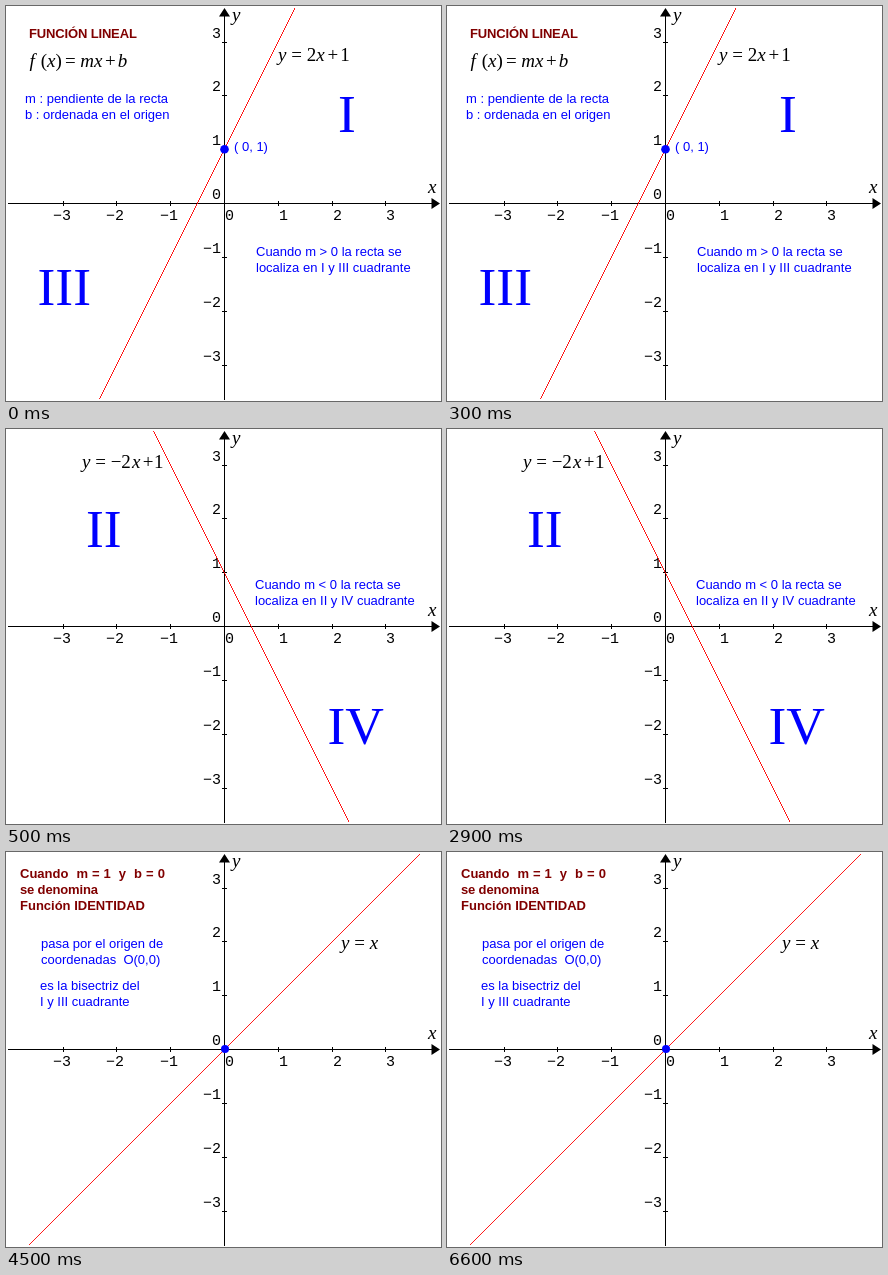
An HTML page for the animation above (8000 ms loop, 435 by 395 pixels).

```html
<!DOCTYPE html>
<html lang="es">
<head>
<meta charset="utf-8">
<title>Función lineal</title>
<style>
  html, body { margin: 0; width: 100%; height: 100%; overflow: hidden; background: #fff; }
  svg { display: block; width: 435px; height: 395px; }
  text { white-space: pre; font: 13px "Liberation Sans", Arial, sans-serif; fill: #00f; }
  .title { font-weight: bold; fill: #800000; }
  .num { font: 15px "Liberation Mono", monospace; fill: #000; }
  .end { text-anchor: end; }
  .math { font: 19px "Liberation Serif", serif; fill: #000; }
  .it { font-style: italic; }
  .quadrant { font: 53.5px "Liberation Serif", serif; }
  .line { stroke: #f00; stroke-width: .9; shape-rendering: crispEdges; }
  .axis { stroke: #000; fill: none; shape-rendering: crispEdges; }
  .scene { visibility: hidden; animation: 8s step-end infinite; }
  .positive { animation-name: positive; }
  .negative { animation-name: negative; }
  .identity { animation-name: identity; }
  @keyframes positive { 0% { visibility: visible; } 6.25%, 100% { visibility: hidden; } }
  @keyframes negative { 0% { visibility: hidden; } 6.25% { visibility: visible; } 56.25%, 100% { visibility: hidden; } }
  @keyframes identity { 0% { visibility: hidden; } 56.25%, 100% { visibility: visible; } }
</style>
</head>
<body>
<svg viewBox="0 0 435 395">
  <g id="axes">
    <path class="axis" d="M2 197.5H430M218.5 6V394"/>
    <path d="M218.5 2L224 10.5H213ZM434 197.5L425.5 192V203Z"/>
    <text class="math it" x="422" y="187">x</text>
    <text class="math it" x="226" y="15">y</text>
  </g>

  <g class="scene positive">
    <path class="line" d="M289 2L93.5 393"/>
    <circle cx="218.5" cy="143.2" r="4.3" fill="#00f"/>
    <text class="title" x="23" y="32" letter-spacing="-.15">FUNCIÓN LINEAL</text>
    <text class="math" x="23.5" y="61"><tspan class="it">f</tspan><tspan dx="6">(</tspan><tspan class="it">x</tspan>)<tspan dx="3">= </tspan><tspan class="it">mx</tspan><tspan dx="2.5">+</tspan><tspan class="it" dx="2">b</tspan></text>
    <text x="19" y="97">m : pendiente de la recta</text>
    <text x="19" y="113">b : ordenada en el origen</text>
    <text class="math" x="272" y="55"><tspan class="it">y</tspan> = 2<tspan class="it">x</tspan><tspan dx="3">+</tspan><tspan dx="2">1</tspan></text>
    <text x="228" y="145">( 0, 1)</text>
    <text x="250" y="250">Cuando m &gt; 0 la recta se</text>
    <text x="250" y="266">localiza en I y III cuadrante</text>
    <text class="quadrant" x="332" y="126">I</text>
    <text class="quadrant" x="31.5" y="299">III</text>
  </g>

  <g class="scene negative">
    <path class="line" d="M147.5 2L343 393"/>
    <text class="math" x="76" y="39"><tspan class="it">y</tspan> = −2<tspan class="it" dx="1">x</tspan><tspan dx="2.5">+</tspan><tspan dx=".5">1</tspan></text>
    <text x="249" y="160">Cuando m &lt; 0 la recta se</text>
    <text x="249" y="176">localiza en II y IV cuadrante</text>
    <text class="quadrant" x="80" y="118">II</text>
    <text class="quadrant" x="321.5" y="314.5">IV</text>
  </g>

  <g class="scene identity">
    <path class="line" d="M23 393L414 2"/>
    <circle cx="219" cy="197" r="4" fill="#00f"/>
    <text class="title" x="14" y="26" word-spacing=".4">Cuando  m = 1  y  b = 0</text>
    <text class="title" x="14" y="42" letter-spacing="-.15">se denomina</text>
    <text class="title" x="14" y="58">Función IDENTIDAD</text>
    <text x="35" y="96">pasa por el origen de</text>
    <text x="35" y="112">coordenadas  O(0,0)</text>
    <text x="34" y="138">es la bisectriz del</text>
    <text x="34" y="154">I y III cuadrante</text>
    <text class="math" x="335" y="97"><tspan class="it">y</tspan> = <tspan class="it">x</tspan></text>
  </g>
</svg>
<script>
  const axes = document.getElementById('axes');
  const unit = 53.83;

  function add(tag, attrs, text = '') {
    const node = document.createElementNS('http://www.w3.org/2000/svg', tag);
    for (const key in attrs) node.setAttribute(key, attrs[key]);
    node.textContent = text;
    axes.append(node);
  }

  for (let n = -3; n <= 3; n++) {
    const x = Math.round(218 + n * unit) + 0.5;
    const y = Math.round(197.1 - n * unit) + 0.5;
    const label = String(n).replace('-', '−');
    if (n) add('path', { class: 'axis', d: `M${x} 195v5M216 ${y}h5` });
    add('text', { class: 'num', x: n < 0 ? x - 10.5 : x + 0.5, y: 214 }, label);
    add('text', { class: 'num end', x: 215, y: y - 5 }, label);
  }
</script>
</body>
</html>
```
